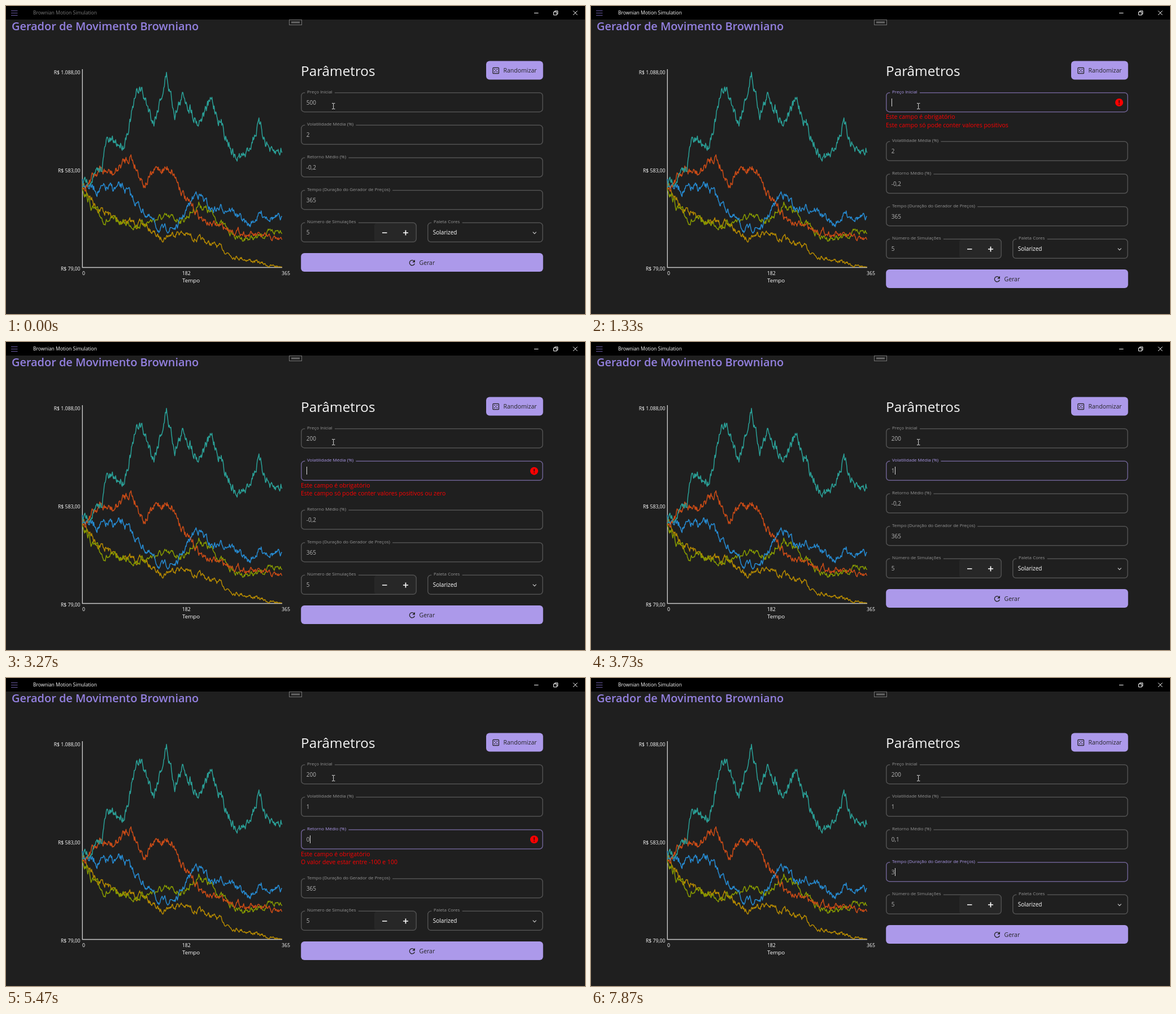
These frames come from a looping animation (1025x546 px, 8000 ms). An HTML page:

```html
<!DOCTYPE html>
<html lang="pt-BR">
<head>
<meta charset="utf-8">
<title>Brownian Motion Simulation</title>
<style>
  html, body { margin: 0; width: 100%; height: 100%; overflow: hidden; background: #1f1f1f; }
  svg { display: block; width: 100%; height: 100%; }
  text { font-family: "Open Sans", "Noto Sans", sans-serif; fill: #fff; }
  .line { fill: none; stroke-width: 1.5; stroke-linejoin: round; }
  .axis { font-size: 8.7px; }
  .box { fill: none; stroke: #515151; stroke-width: 1.5; }
  .notch { fill: #1f1f1f; }
  .label { font-size: 8px; fill: #959595; }
  .value { font-size: 10px; fill: #b4b4b4; }
  .focused .box { stroke: #6c6090; }
  .focused .label { fill: #ac99ea; }
  .error { font-size: 10.5px; fill: #f00; }
  .button { fill: #ac99ea; }
  .caption { font-size: 10.5px; fill: #242424; }
  .icon { fill: none; stroke: #242424; stroke-width: 1.3; }
  .glyph { fill: none; stroke: #fff; stroke-width: 1; }
</style>
</head>
<body>
<svg id="stage" viewBox="0 0 1025 546">
  <rect width="1025" height="546" fill="#1f1f1f"/>
  <rect width="1025" height="24" fill="#000"/>
  <path d="M9 8.5h11.5M9 12.5h11.5M9 16.5h11.5" stroke="#6c5ca6"/>
  <text id="appTitle" x="48" y="15.2" font-size="8.53">Brownian Motion Simulation</text>
  <path class="glyph" d="M935 12.500h7.500M1004 8.500l7.500 7.500m0-7.500l-7.500 7.500"/>
  <path class="glyph" d="M969.500 10.500h5.500v5.500h-5.500zM971.500 10V8.700h5.300v5.600h-1.500"/>
  <rect x="501.500" y="24.500" width="22" height="9" fill="#1f1f1f" stroke="#747474"/>
  <rect x="505" y="27.500" width="15" height="3" fill="#666"/>
  <text x="10" y="43.2" font-size="19.9" font-weight="600" style="fill:#9380df">Gerador de Movimento Browniano</text>

  <path d="M135.300 112v351.500H489" fill="none" stroke="#c8c8c8" stroke-width="1.4"/>
  <g class="axis">
    <g text-anchor="end">
      <text x="131.500" y="121">R$ 1.088,00</text>
      <text x="131.500" y="294.500">R$ 583,00</text>
      <text x="131.500" y="468.500">R$ 79,00</text>
    </g>
    <text x="135" y="477">0</text>
    <text x="311.800" y="477">182</text>
    <text x="488" y="477">365</text>
  </g>
  <text x="312" y="490" font-size="9.8">Tempo</text>
  <g id="lines"></g>

  <text x="522" y="123.700" font-size="24.3" style="fill:#f6f6f6">Parâmetros</text>
  <rect class="button" x="850" y="97.400" width="100.800" height="33" rx="6"/>
  <g class="icon">
    <rect x="862" y="109.300" width="10.400" height="10.400" rx="1"/>
    <path d="M864.300 112.300h1.600m2.600 0h1.600M866.400 114.500h1.600M864.300 116.800h1.600m2.600 0h1.600" stroke-width="1.6"/>
  </g>
  <text class="caption" x="880.500" y="118">Randomizar</text>

  <g id="fields"></g>
  <g id="footer">
    <rect x="652" y="385.200" width="73.500" height="32.500" rx="4" fill="#272727"/>
    <path d="M666 402h8.500M703 402h9M707.500 397.500v9" stroke="#fff" stroke-width="1.7"/>
    <path d="M932.700 400.700l3 3 3-3" fill="none" stroke="#ccc" stroke-width="1.1"/>
    <rect class="button" x="522.200" y="438" width="428.600" height="33" rx="6"/>
    <path class="icon" d="M722.500 452.300a4.600 4.600 0 1 0 .9 4.200"/>
    <path d="M724 449.700v4.800h-4.800z" fill="#242424"/>
    <text class="caption" x="731.500" y="458.700">Gerar</text>
  </g>

  <g id="errors">
    <circle cx="935" r="7" fill="#f00"/>
    <path stroke="#241010" stroke-width="1.6"/>
    <text class="error" x="522"></text>
    <text class="error" x="522"></text>
  </g>
  <rect id="caret" width="1" height="14" fill="#ddd"/>
  <path d="M577 172.500h2l.7.6.7-.6h2M579.700 173v9M577 182.500h2l.7-.6.7.6h2" fill="none" stroke="#ddd"/>
</svg>
<script>
const $ = id => document.getElementById(id);

function add(parent, tag, attrs, text = '') {
  const node = document.createElementNS('http://www.w3.org/2000/svg', tag);
  for (const key in attrs) node.setAttribute(key, attrs[key]);
  node.textContent = text;
  return parent.appendChild(node);
}

// Each price path follows a few turning points, roughened by seeded mean-reverting noise.
const trends = {
  '#b58900': 'M135 315L160 355L195 378L245 388L272 412L305 400L377 427L400 442L470 461L489 462',
  '#859900': 'M135 318L152 358L175 380L235 388L270 376L315 378L343 350L408 411L440 412L489 396',
  '#268bd2': 'M135 310L160 326L208 322L272 397L303 392L338 328L362 360L396 358L430 390L450 368L489 379',
  '#cb4b16': 'M135 322L163 290L190 298L220 264L245 316L268 288L293 288L320 346L352 383L430 405L489 415',
  '#2aa198': 'M135 316L168 292L178 240L208 245L236 142L262 205L284 124L299 188L315 158L340 205L364 168L407 270L425 264L447 210L472 265L489 254'
};

let seed = 7;
const random = () => (seed = seed * 16807 % 2147483647) / 2147483647;

function pricePath(trend) {
  const points = trend.slice(1).split('L').map(pair => pair.split(' ').map(Number));
  const days = 365;
  let noise = 0, segment = 0, path = '';
  for (let day = 0; day <= days; day++) {
    const x = 135 + day / days * 353.5;
    while (x > points[segment + 1][0]) segment++;
    const [[x0, y0], [x1, y1]] = points.slice(segment);
    const base = y0 + (y1 - y0) * (x - x0) / (x1 - x0);
    noise = noise * 0.72 + (random() - 0.5) * Math.sqrt(480 - base) * 0.95;
    const y = Math.min(462.5, Math.max(112, base + noise));
    path += `${day ? 'L' : 'M'}${x.toFixed(1)} ${y.toFixed(1)}`;
  }
  return path;
}

for (const color in trends) add($('lines'), 'path', { class: 'line', stroke: color, d: pricePath(trends[color]) });

// Form
const TOP = 153.7, PITCH = 57.65, ERROR_LINE = 14.5;
const rowTop = row => TOP + row * PITCH;

function outlined(x, row, width, label, value, parent) {
  const y = rowTop(row);
  const group = add(parent, 'g', {});
  add(group, 'rect', { class: 'box', x, y, width, height: 34, rx: 5.5 });
  const notch = add(group, 'rect', { class: 'notch', x: x + 6.5, y: y - 2, height: 4 });
  const caption = add(group, 'text', { class: 'label', x: x + 10.2, y: y + 1 }, label);
  notch.setAttribute('width', caption.getComputedTextLength() + 8);
  return { group, value: add(group, 'text', { class: 'value', x: x + 9, y: y + 20.9 }, value) };
}

const labels = ['Preço Inicial', 'Volatilidade Média (%)', 'Retorno Médio (%)', 'Tempo (Duração do Gerador de Preços)'];
const initial = ['500', '2', '-0,2', '365'];
const fields = labels.map((label, row) => outlined(522.8, row, 427.2, label, initial[row], $('fields')));
outlined(522.8, 4, 203.4, 'Número de Simulações', '5', $('footer'));
outlined(746.8, 4, 203.2, 'Paleta Cores', 'Solarized', $('footer')).value.style.fill = '#fff';

const required = 'Este campo é obrigatório';
const positive = 'Este campo só pode conter valores positivos';
const range = 'O valor deve estar entre -100 e 100';

// Typing script: time, focused field, its text, error lines
const steps = [
  [0, -1, ''],
  [70, 0, '500'],
  [1070, 0, '50'],
  [1130, 0, '5'],
  [1330, 0, '', required, positive],
  [2000, 0, '2', required, positive],
  [2070, 0, '2'],
  [2400, 0, '20'],
  [2530, 0, '200'],
  [2930, 1, '2'],
  [3270, 1, '', required, positive + ' ou zero'],
  [3730, 1, '1'],
  [4130, 2, '-0,2'],
  [4470, 2, '-0,'],
  [4600, 2, '-0'],
  [4730, 2, '-'],
  [4800, 2, '-', range],
  [5000, 2, '', range],
  [5070, 2, '', required, range],
  [5470, 2, '0', required, range],
  [5530, 2, '0'],
  [5800, 2, '0,'],
  [6400, 2, '0,1'],
  [7200, 3, '365'],
  [7730, 3, '36'],
  [7870, 3, '3']
];

const advance = { '-': 4.2, ',': 2.28 };
const caretX = text => Math.round([...text].reduce((x, ch) => x + (advance[ch] || 5.66), 531.9));
const show = (node, on) => node.setAttribute('visibility', on ? 'visible' : 'hidden');
const [badge, mark, ...errorLines] = $('errors').children;

function render(index) {
  const values = [...initial];
  for (const [, field, text] of steps.slice(1, index + 1)) values[field] = text;
  const [, focus, text, ...errors] = steps[index];
  const shift = `translate(0 ${errors.length * ERROR_LINE})`;

  fields.forEach(({ group, value }, row) => {
    value.textContent = values[row];
    group.setAttribute('class', row === focus ? 'focused' : '');
    group.setAttribute('transform', row > focus ? shift : '');
  });
  $('footer').setAttribute('transform', shift);
  $('appTitle').style.fill = focus < 0 ? '#7c7c7c' : '#fff';

  const y = rowTop(Math.max(focus, 0));
  show($('caret'), focus >= 0);
  $('caret').setAttribute('x', caretX(text));
  $('caret').setAttribute('y', Math.round(y + 10));

  show($('errors'), errors.length);
  badge.setAttribute('cy', y + 17.3);
  mark.setAttribute('d', `M935 ${y + 13.3}v5m0 1.3v1.6`);
  errorLines.forEach((line, i) => {
    line.setAttribute('y', y + 46.6 + i * 14.3);
    line.textContent = errors[i] || '';
  });
}

const start = performance.now();
let current = -1;

function tick() {
  const time = (performance.now() - start) % 8000;
  const index = steps.findLastIndex(step => step[0] <= time);
  if (index !== current) render(current = index);
  requestAnimationFrame(tick);
}
tick();
</script>
</body>
</html>
```
